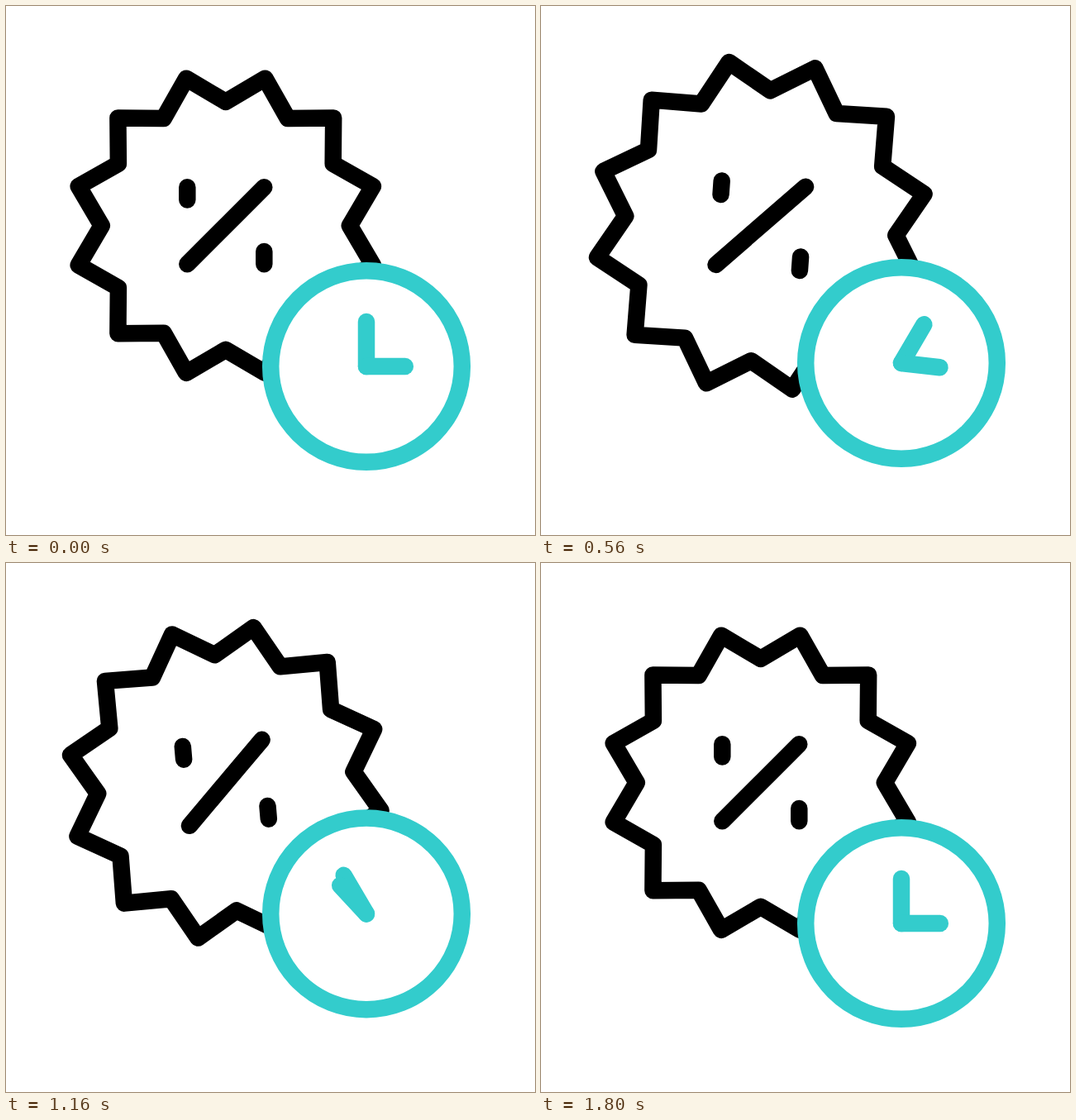
An HTML page that plays this animation: 640 px wide and 640 px high, repeating every 1.92 s.

```html
<!DOCTYPE html>
<html lang="en">
<head>
<meta charset="utf-8">
<title>Limited-time discount</title>
<style>
  html, body { margin: 0; height: 100%; overflow: hidden; background: #fff; }
  svg { display: block; width: 100vw; height: 100vh; }
</style>
</head>
<body>
<svg viewBox="0 0 640 640" fill="none" stroke-linecap="round" stroke-linejoin="round">
  <g id="badge" stroke="#000">
    <path id="star"/>
    <path d="M-46.5 46.5L46.5 -46.5M-46.5 -46.5V-31.3M46.5 31.3V46.5"/>
  </g>
  <g id="clock" stroke="#33cccc" stroke-width="20.5">
    <circle r="115.8" fill="#fff"/>
    <path id="minute" d="M0 0V-54"/>
    <path id="hour" d="M0 0H46.8"/>
  </g>
</svg>
<script>
const LOOP = 1920, STEP = 40, LAST = 1800;
const STROKE = 20.5;
const SOFT = 1 / 3, STRONG = 0.57;
const el = id => document.getElementById(id);
const [badge, star, clock, minute, hour] = ['badge', 'star', 'clock', 'minute', 'hour'].map(el);

// Twelve-pointed star: even corners inside, odd corners outside.
const corners = Array.from({ length: 24 }, (_, i) => {
  const angle = i * Math.PI / 12;
  const radius = i % 2 ? 184.4 : 150;
  return [radius * Math.sin(angle), -radius * Math.cos(angle)].map(v => v.toFixed(2));
});
star.setAttribute('d', `M${corners.join('L')}Z`);

// Symmetric cubic-bezier(a, 0, 1 - a, 1), solved by bisection.
function ease(u, a) {
  if (u <= 0) return 0;
  if (u >= 1) return 1;
  let low = 0, high = 1;
  for (let i = 0; i < 24; i++) {
    const s = (low + high) / 2, r = 1 - s;
    const x = 3 * a * s * r * r + 3 * (1 - a) * s * s * r + s ** 3;
    if (x < u) low = s; else high = s;
  }
  return low * low * (3 - 2 * low);
}

const ramp = (t, from, to, a = STRONG) => ease((t - from) / (to - from), a);
const pulse = (t, from, peak, to) => ramp(t, from, peak) - ramp(t, peak, to);

function draw(t) {
  const tilt = 6 * ramp(t, 0, 380, SOFT)
    - 11.6 * ramp(t, 380, 1070, SOFT)
    + 5.6 * ramp(t, 1070, 1470, SOFT);
  const scale = 1 + 0.106 * pulse(t, 70, 760, 1450);
  badge.setAttribute('transform', `translate(265.8 265.8) rotate(${tilt}) scale(${scale})`);
  badge.setAttribute('stroke-width', STROKE / scale);

  const lift = 13 * pulse(t, 270, 970, 1670);
  clock.setAttribute('transform', `translate(436 ${436 - lift})`);
  minute.setAttribute('transform', `rotate(${360 * ramp(t, 270, 1450)})`);
  hour.setAttribute('transform', `rotate(${360 * ramp(t, 390, 1770)})`);
}

const start = performance.now();
function tick() {
  const t = (performance.now() - start) % LOOP;
  draw(Math.min(LAST, Math.floor(t / STEP) * STEP));
  requestAnimationFrame(tick);
}
tick();
</script>
</body>
</html>
```
